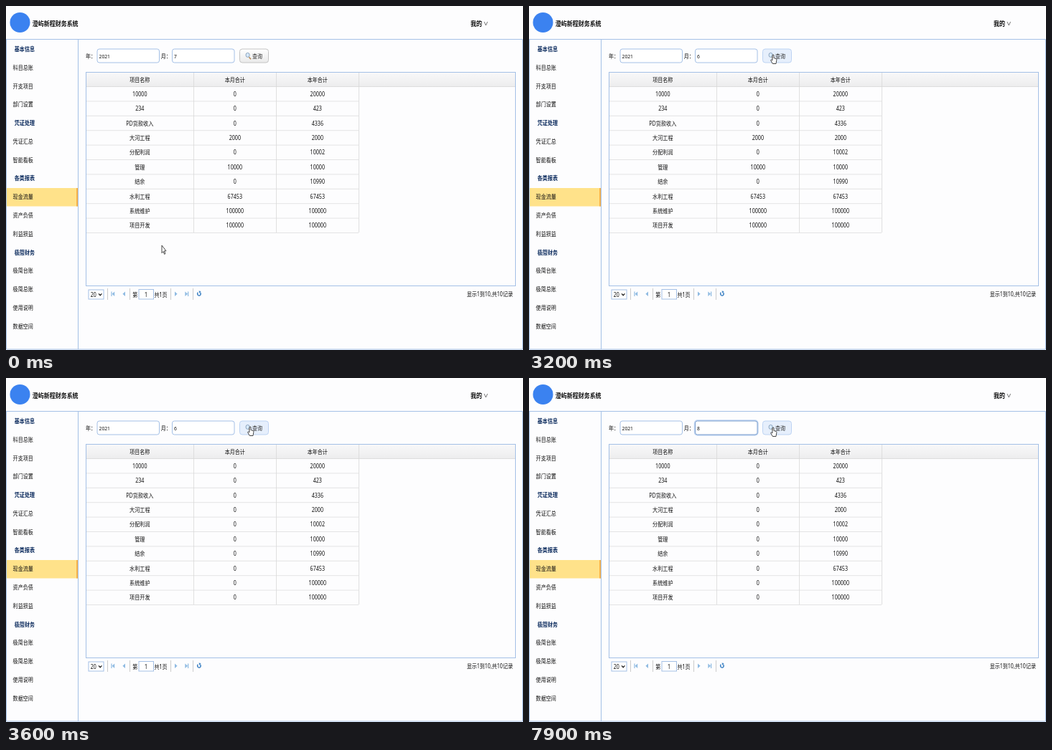
Recreate the animation shown at these times as an HTML page. Size 720 by 480 pixels, loop 8 s.

```html
<!DOCTYPE html>
<html lang="zh">
<head>
<meta charset="utf-8">
<style>
html, body { margin: 0; width: 100%; height: 100%; overflow: hidden; background: #fdfdfe; }
svg { display: block; font-family: "Noto Sans", "Noto Sans CJK SC", sans-serif; }
</style>
</head>
<body>
<svg id="stage" width="720" height="480" viewBox="0 0 720 480"></svg>
<script>
const BLUE = '#a4c0e6', NAVY = '#0e2d5f', SQUEEZE = 0.84, LOOP = 8000;
const stage = document.getElementById('stage');

// Text is centred vertically on y; the whole interface is slightly narrowed.
const text = (s, x, y, { size = 8.4, anchor = 'start', fill = '#111', weight = 400, id = '' } = {}) =>
  `<text ${id && `id="${id}"`} transform="translate(${x} ${y + size * 0.37}) scale(${SQUEEZE} 1)"
    font-size="${size}" text-anchor="${anchor}" fill="${fill}" font-weight="${weight}">${s}</text>`;
const rect = (x, y, w, h, fill, more = '') =>
  `<rect x="${x}" y="${y}" width="${w}" height="${h}" fill="${fill}" ${more}/>`;
const path = (d, stroke, more = '') => `<path d="${d}" fill="none" stroke="${stroke}" ${more}/>`;
const gradient = (id, top, bottom) =>
  `<linearGradient id="${id}" x2="0" y2="1"><stop stop-color="${top}"/><stop offset="1" stop-color="${bottom}"/></linearGradient>`;
const border = (c = BLUE, r = 0) => `stroke="${c}" rx="${r}"`;

const menu = ['*基本信息', '科目总账', '开支项目', '部门设置', '*凭证处理', '凭证汇总', '智能看板', '*各类报表',
  '现金流量', '资产负债', '利益损益', '*极简财务', '极简台账', '极简总账', '使用说明', '数据空间'];
const rows = [['10000', 0, 20000], ['234', 0, 423], ['PD货款收入', 0, 4336], ['大河工程', 2000, 2000],
  ['分配利润', 0, 10002], ['管理', 10000, 10000], ['结余', 0, 10990], ['水利工程', 67453, 67453],
  ['系统维护', 100000, 100000], ['项目开发', 100000, 100000]];
const centers = [186.3, 318.8, 433.8];

function header() {
  return '<circle cx="19.5" cy="23" r="14" fill="#3b82f0"/>' +
    text('澄屿新程财务系统', 36.8, 24, { size: 9.5, weight: 700 }) +
    text('我的', 647, 24, { size: 9.5, weight: 700 }) +
    path('M666 22l2.3 5l2.3-5', '#666', 'stroke-width=".9"') +
    path('M0 46.5H719.5V479H.5V46.5M100.5 46.5V479', BLUE);
}

function sidebar() {
  return rect(1, 254, 99, 25.5, '#ffe28a') + rect(98, 254, 2, 25.5, '#f7b24a') +
    menu.map((s, i) => {
      const y = 60 + 25.77 * i;
      return s[0] === '*' ? text(s.slice(1), 11.8, y, { fill: NAVY, weight: 700 }) : text(s, 9.6, y);
    }).join('');
}

function form() {
  return text('年：', 111, 69.5) + rect(127, 60, 86.5, 19, '#fff', border(BLUE, 3)) +
    text('2021', 129.6, 70, { size: 8 }) +
    text('月：', 215.8, 69.5) +
    `<rect id="glow" x="230.7" y="59.2" width="88" height="20.6" rx="4" fill="none" stroke="#c4d8f3" stroke-width="2"/>` +
    `<rect id="month" x="231.5" y="60" width="86.5" height="19" rx="3" fill="#fff"/>` +
    text('', 234, 70, { size: 8, id: 'digit' }) +
    `<path id="caret" d="M238.5 64.5V75" stroke="#111"/>` +
    `<rect id="button" x="325.5" y="60" width="40" height="19" rx="3.5"/>` +
    path('M338.4 71.2l2.6 3', '#b58a55', 'stroke-width="1.6"') +
    '<ellipse cx="336.6" cy="68.4" rx="2.6" ry="3" fill="#d7e9fa" stroke="#8ba3bd"/>' +
    text('查询', 343, 69.7, { fill: '#333' });
}

function table() {
  let out = rect(111.5, 92.5, 598, 298, '#fdfdfe') + rect(112, 93, 597, 19, 'url(#head)') +
    path('M112 112.5H709', '#ddd');
  ['项目名称', '本月合计', '本年合计'].forEach((s, i) => out += text(s, centers[i], 102.5, { anchor: 'middle' }));
  rows.forEach((row, r) => {
    const y = 122.7 + 20.4 * r;
    out += path(`M112 ${(y + 10.2).toFixed(1)}H491`, '#ddd', 'stroke-width=".8"');
    row.forEach((v, c) => out += text(v, centers[c], y,
      { size: 8.5, anchor: 'middle', id: c === 1 ? 'sum' + r : '' }));
  });
  return out + path('M261.5 93V316M376.5 93V316M491.5 93V316', '#d9d9d9', 'stroke-width=".8"') +
    rect(111.5, 92.5, 598, 298, 'none', border());
}

function pager() {
  const arrow = (x, dir, bar) => `<path d="M${x - dir * 1.6} 398.6v6.4l${dir * 3.6}-3.2z" fill="#8fbbe2"/>` +
    (bar ? path(`M${x + dir * 2.6} 398.6v6.4`, '#8fbbe2', 'stroke-width="1.2"') : '');
  return rect(115, 396, 21, 13, '#fff', border()) + text('20', 117.8, 402.8) +
    path('M129 401.4l2.2 2.4l2.2-2.4', '#222', 'stroke-width="1.3"') +
    path('M141.5 394V410M172.5 394V410M229.5 394V410M260.5 394V410', '#ccc') +
    arrow(149.6, -1, true) + arrow(164.4, -1) + arrow(236.6, 1) + arrow(251, 1, true) +
    text('第', 176.3, 403) + rect(185, 395.5, 20.5, 13.5, '#fff', border()) +
    text('1', 195, 402.8, { anchor: 'middle' }) + text('共1页', 206.5, 403) +
    path('M267.4 399.6A2.2 2.6 0 1 0 270.6 399.8', '#3f83c4', 'stroke-width="1.4"') +
    '<path d="M268.5 397.5l3 .5l-2 3z" fill="#3f83c4"/>' +
    text('显示1到10,共10记录', 706, 402, { anchor: 'end' });
}

function loading() {
  return '<g id="loading">' + rect(101, 47, 618.5, 428, '#ccc', 'opacity=".4"') +
    rect(337, 145, 150, 92, '#888', 'rx="4" opacity=".35"') +
    rect(335.5, 143, 149.5, 92, 'url(#title)', border(BLUE, 4)) +
    text('提示', 338.3, 153, { fill: NAVY, weight: 700 }) +
    rect(338.5, 163.5, 144, 68.5, '#fff', border()) + text('正在加载', 348.8, 183) +
    rect(349, 192, 122.5, 13.5, '#fff', border(BLUE, 3)) + '</g>';
}

function cursors() {
  return '<g id="arrow"><path d="M0 0V10.6L2 8.6L3.6 12.4L4.9 11.6L3.4 7.8H6Z" fill="#fff" stroke="#333" stroke-width=".9"/></g>' +
    '<g id="beam">' + path('M-2-5.3H-.5L0-4.7L.5-5.3H2M0-4.7V4.7M-2 5.3H-.5L0 4.7L.5 5.3H2', '#222') + '</g>' +
    '<g id="hand"><path d="M-1 0Q0-1 1 0V4L4.2 5Q5 5.4 4.8 7L4 12H-.7L-3.4 7.2Q-3.2 5.6-1 7.2Z" fill="#fff" stroke="#333" stroke-width=".9"/></g>';
}

stage.innerHTML = '<defs>' + gradient('head', '#f8f8f9', '#ededee') + gradient('plain', '#fff', '#eaeaea') +
  gradient('title', '#f1f6ff', '#dfebff') + '</defs>' +
  header() + sidebar() + form() + table() + pager() + loading() + cursors();

const el = id => document.getElementById(id);
const show = (id, on) => el(id).setAttribute('visibility', on ? 'visible' : 'hidden');
const set = (id, attrs) => { for (const k in attrs) el(id).setAttribute(k, attrs[k]); };

// Pointer moves: start, end, destination.
const moves = [[0, 800, 257, 82], [950, 1300, 257, 69], [2700, 3150, 340, 68.5],
  [4600, 5200, 256.5, 68.5], [7100, 7800, 340, 69.5]];

function pointer(t) {
  let x = 217, y = 334;
  for (const [from, to, tx, ty] of moves) {
    const p = Math.min(1, Math.max(0, (t - from) / (to - from))), k = p * p * (3 - 2 * p);
    x += (tx - x) * k;
    y += (ty - y) * k;
  }
  return [x, y];
}

function draw(t) {
  const within = (a, b) => t >= a && t < b;
  const [x, y] = pointer(t);
  const busy = within(3300, 3600), inRow = y > 60 && y < 79;
  const hover = !busy && inRow && x > 325 && x < 366;
  const kind = hover ? 'hand' : !busy && inRow && x > 231 && x < 318 ? 'beam' : 'arrow';
  for (const id of ['arrow', 'beam', 'hand']) show(id, id === kind);
  set(kind, { transform: `translate(${x} ${y})` });

  const focus = within(1400, 3200) || t >= 5500;
  show('glow', focus);
  set('month', { stroke: focus ? '#7d9fce' : BLUE });
  show('caret', within(1400, 2200) || within(5500, 5600));
  el('digit').textContent = t < 2200 ? '7' : t < 2300 ? '' : t < 5600 ? '6' : t < 5800 ? '' : '8';
  set('button', hover ? { fill: '#e6effc', stroke: '#bdd3f3' } : { fill: 'url(#plain)', stroke: '#c4c4c4' });
  rows.forEach((row, r) => el('sum' + r).textContent = t < 3600 ? row[1] : 0);
  show('loading', busy);
}

const start = performance.now();
function frame() {
  draw((performance.now() - start) % LOOP);
  requestAnimationFrame(frame);
}
frame();
</script>
</body>
</html>
```
